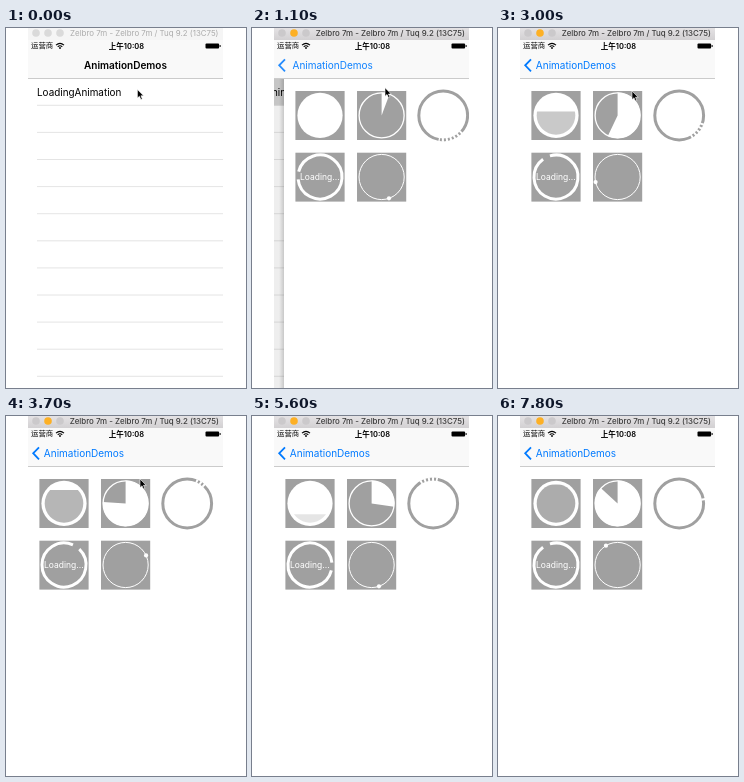
An HTML page for the animation above (7900 ms loop, 240 by 360 pixels).

```html
<!DOCTYPE html>
<html lang="zh">
<head>
<meta charset="utf-8">
<title>AnimationDemos</title>
<style>
html, body { margin: 0; width: 100%; height: 100%; overflow: hidden; background: #fff; }
svg { display: block; width: 240px; height: 360px; font-family: Inter, "Noto Sans CJK SC", "Noto Sans CJK", sans-serif; }
.mid { text-anchor: middle; }
.box { fill: #a0a0a0; }
.line { fill: none; stroke: #fff; }
</style>
</head>
<body>
<svg viewBox="0 0 240 360">
  <defs>
    <clipPath id="win"><rect x="22" width="195" height="360"/></clipPath>
    <clipPath id="level"><rect id="levelRect" x="33" width="50" height="50"/></clipPath>
    <linearGradient id="shade">
      <stop offset="0" stop-color="#000" stop-opacity="0"/>
      <stop offset="1" stop-color="#000" stop-opacity=".16"/>
    </linearGradient>
    <linearGradient id="barFill" x2="0" y2="1">
      <stop offset="0" stop-color="#e4e2e4"/>
      <stop offset="1" stop-color="#d2d0d2"/>
    </linearGradient>
  </defs>

  <g clip-path="url(#win)">
    <g id="list">
      <rect x="22" y="51" width="195" height="309" fill="#fff"/>
      <rect id="press" x="22" y="51" width="195" height="26.5" fill="#d3d3d3"/>
      <g id="rows" stroke="#dedede" stroke-width=".8"></g>
      <text x="31" y="67.6" font-size="9.92">LoadingAnimation</text>
    </g>
    <rect id="dim" x="22" y="51" width="195" height="309"/>

    <g id="page">
      <rect x="17" y="51" width="5" height="309" fill="url(#shade)"/>
      <rect x="22" y="51" width="195" height="309" fill="#fff"/>

      <rect class="box" x="33.4" y="63" width="49.2" height="49"/>
      <g id="ball">
        <circle cx="58" cy="87.4" r="22.6" fill="#fff"/>
        <circle id="water" cx="58" cy="87.4" r="19.3" fill="#a0a0a0" clip-path="url(#level)"/>
      </g>

      <rect class="box" x="95" y="63" width="49.2" height="49"/>
      <g id="pie">
        <circle class="line" cx="119.6" cy="87.4" r="22.5" stroke-width="1.3"/>
        <path id="slice" fill="#fff"/>
      </g>

      <circle cx="181.2" cy="87.5" r="24.4" fill="none" stroke="#a0a0a0" stroke-width="3"/>
      <path id="dashes" class="line" stroke-width="4" stroke-dasharray="2 2"/>

      <rect class="box" x="33.4" y="124.7" width="49.2" height="48.9"/>
      <path id="loop" class="line" stroke-width="3"/>
      <text class="mid" x="57.8" y="152.3" font-size="8.5" fill="#fff">Loading...</text>

      <rect class="box" x="95" y="124.7" width="49.2" height="48.9"/>
      <circle class="line" cx="119.6" cy="149" r="22.6" stroke-width="1"/>
      <circle id="dot" r="2.1" fill="#fff"/>
    </g>

    <rect x="22" y="12" width="195" height="39" fill="#f9f9f9"/>
    <rect x="22" y="50.3" width="195" height=".7" fill="#b8b8b8"/>
    <text x="25" y="20.4" font-size="7.4">运营商</text>
    <g fill="none" stroke="#000" stroke-width="1.1">
      <path d="M50 17.2Q54 13.6 58 17.2M51.7 18.8Q54 16.8 56.3 18.8"/>
    </g>
    <circle cx="54" cy="20" r=".9"/>
    <text class="mid" x="120.5" y="20.5" font-size="7.5" font-weight="600">上午10:08</text>
    <rect x="199.5" y="15.4" width="13.6" height="5.2" rx="1"/>
    <rect x="213.6" y="17" width="1" height="2"/>
    <text id="title" class="mid" y="41" font-size="10" font-weight="600">AnimationDemos</text>
    <text id="back" class="mid" y="41" font-size="10" fill="#007aff">AnimationDemos</text>
    <path id="chevron" d="M33 31.3L27.2 37.3L33 43.3" fill="none" stroke="#007aff" stroke-width="1.8"/>

    <rect id="bar" x="22" width="195" height="12"/>
    <g id="lights"><circle cx="30" cy="5" r="3.8"/><circle cx="42" cy="5" r="3.8"/><circle cx="54" cy="5" r="3.8"/></g>
    <text id="caption" class="mid" x="138.3" y="8.3" font-size="7.9">Zelbro 7m - Zelbro 7m / Tuq 9.2 (13C75)</text>
  </g>

  <path id="cursor" d="M0 0V8.6L2 6.8L3.5 10L4.9 9.4L3.5 6.3H6.2Z" stroke="#fff" stroke-width=".6"/>
</svg>

<script>
const LOOP = 7900, STEP = 100;
const OPEN = 842;    // the detail page starts to slide in
const TICK = 890;    // the progress loaders start to count
const SPIN = 820;    // the dashed ring starts to turn
const TAP = 700, FOCUS = 400;
const $ = id => document.getElementById(id);
const set = (id, attrs) => {
  for (const key in attrs) $(id).setAttribute(key, attrs[key]);
};

// Cursor tip: time, x, y
const cursorPath = [
  [0, 131.4, 61.5], [600, 133, 59.7], [2300, 133, 59.7], [3000, 134, 63],
  [4000, 134, 63], [4500, 124.5, 61.5], [5000, 112, 28], [5300, 102, -14]
];

$('rows').innerHTML = Array.from({ length: 11 }, (_, i) =>
  `<path d="M31 ${(77.3 + i * 27.1).toFixed(1)}H235"/>`).join('');

// Angles are degrees clockwise from the top.
function point(cx, cy, r, deg) {
  const a = (deg - 90) * Math.PI / 180;
  return [(cx + r * Math.cos(a)).toFixed(2), (cy + r * Math.sin(a)).toFixed(2)];
}

function arc(cx, cy, r, from, to) {
  const large = to - from > 180 ? 1 : 0;
  return `M${point(cx, cy, r, from)}A${r} ${r} 0 ${large} 1 ${point(cx, cy, r, to)}`;
}

// cubic-bezier(.42, 0, 1, 1)
function easeIn(x) {
  let lo = 0, hi = 1, s = .5;
  for (let i = 0; i < 20; i++) {
    s = (lo + hi) / 2;
    const bx = 1.26 * s * (1 - s) ** 2 + 3 * s * s * (1 - s) + s ** 3;
    if (bx < x) lo = s; else hi = s;
  }
  return 3 * s * s * (1 - s) + s ** 3;
}

// Critically damped push
function push(t) {
  if (t <= OPEN) return 0;
  if (t >= OPEN + 500) return 1;
  const w = 18.26 * (t - OPEN) / 1000;
  return 1 - (1 + w) * Math.exp(-w);
}

function cursorAt(t) {
  const i = cursorPath.findIndex(k => k[0] > t);
  if (i < 0) return cursorPath[cursorPath.length - 1].slice(1);
  const [t0, x0, y0] = cursorPath[i - 1], [t1, x1, y1] = cursorPath[i];
  const f = (t - t0) / (t1 - t0);
  return [x0 + (x1 - x0) * f, y0 + (y1 - y0) * f];
}

function drawWindow(t) {
  const active = t >= FOCUS;
  set('bar', { fill: active ? 'url(#barFill)' : '#f5f5f5' });
  set('caption', { fill: active ? '#3c3c3c' : '#ababab', 'font-weight': active ? 500 : 400 });
  [...$('lights').children].forEach((c, i) =>
    c.setAttribute('fill', !active ? '#dadada' : i === 1 ? '#fdb024' : '#cbc9cb'));
  set('cursor', { transform: `translate(${cursorAt(t)})` });
}

function drawPush(t) {
  const p = push(t), x = 119.5 - 41.5 * p ** 1.25;
  set('press', { opacity: t >= TAP ? 1 : 0 });
  set('list', { transform: `translate(${-58.5 * p})` });
  set('dim', { opacity: .07 * p });
  set('page', { transform: `translate(${195 * (1 - p) + (p ? 0 : 10)})` });
  set('title', { x, opacity: (1 - p) ** 2 });
  set('back', { x, opacity: p });
  set('chevron', { opacity: p ** 3 });
}

function drawLoaders(t) {
  const age = Math.max(0, t - TICK);
  const p = age / 3700 % 1;
  const shown = age > STEP ? 1 : 0;

  set('ball', { opacity: shown });
  set('pie', { opacity: shown });
  set('levelRect', { y: 112 - 50 * p });
  set('water', { opacity: p });
  set('slice', { d: arc(119.6, 87.4, 22.8, 0, 360 * p) + 'L119.6 87.4Z' });

  const u = Math.max(0, t - SPIN) / 1000 % 1;
  set('dashes', { d: arc(181.2, 87.5, 24.4, 90 + 360 * easeIn(u), 90 + 360 * u) });

  const gap = .6 * t - 26;
  set('loop', { d: arc(58, 149, 22, gap + 10, gap + 350) });

  const [cx, cy] = point(119.6, 149, 22.6, .24 * t + 257);
  set('dot', { cx, cy });
}

const start = performance.now();
function draw() {
  const now = Math.max(0, performance.now() - start) % LOOP;
  const t = Math.floor(now / STEP) * STEP;
  drawWindow(t);
  drawPush(t);
  drawLoaders(t);
  requestAnimationFrame(draw);
}
draw();
</script>
</body>
</html>
```
